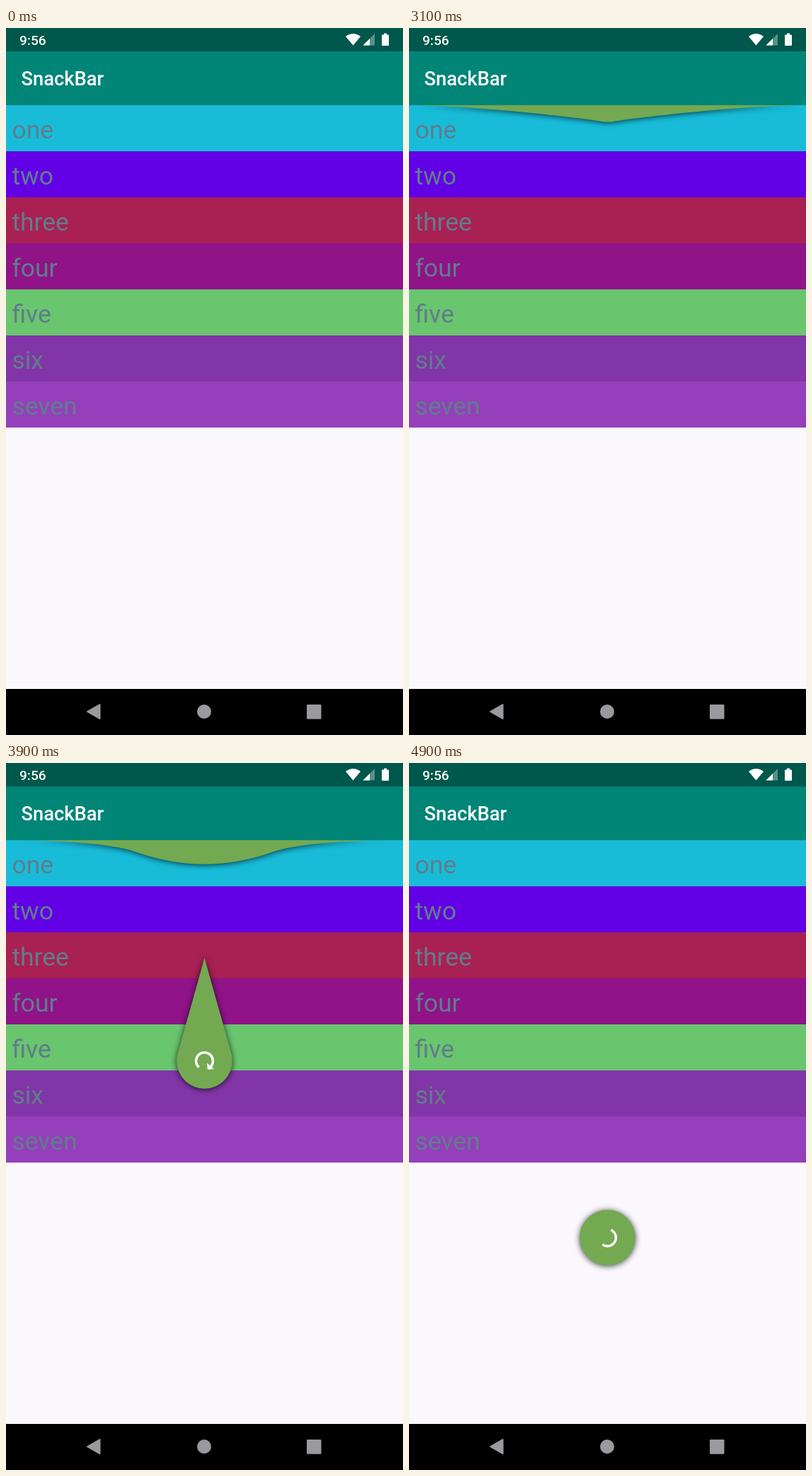
An HTML page with a canvas for the animation above (5000 ms loop, 561 by 998 pixels).

```html
<!DOCTYPE html>
<html lang="en">
<head>
<meta charset="utf-8">
<title>Pull to refresh</title>
<style>
  html, body { margin: 0; width: 100%; height: 100%; overflow: hidden; background: #faf8fc; }
  body { position: relative; font-family: Roboto, sans-serif; }
  .status, .appbar, .nav, li, canvas, svg { position: absolute; left: 0; }
  .status { top: 0; width: 561px; height: 33px; background: #00574b; }
  .appbar { top: 33px; width: 561px; height: 76px; background: #008577; }
  .nav { top: 933px; width: 561px; height: 65px; background: #000; }
  ul { margin: 0; padding: 0; list-style: none; }
  li { width: 561px; height: 65px; }
  svg, canvas { top: 0; }
  .label { font-size: 35.5px; fill: #607d8b; }
  .clock { font-size: 19.1px; font-weight: 500; fill: #fff; }
  .title { font-size: 27.3px; font-weight: 500; fill: #fff; }
</style>
</head>
<body>
<div class="status"></div>
<div class="appbar"></div>
<ul id="rows"></ul>
<div class="nav"></div>
<svg id="ui" width="561" height="998" viewBox="0 0 561 998">
  <text class="clock" x="19" y="24">9:56</text>
  <text class="title" x="21.5" y="81">SnackBar</text>
  <g fill="#fff">
    <path d="M480 12 Q490.5 4 501 12 L490.5 24.5Z"/>
    <path d="M504.500 24.500 L521 8 V24.500Z" opacity=".35"/>
    <path d="M504.500 24.500 L514 15 V24.500Z"/>
    <path d="M534 7.500h4v2h2q1 0 1 1v13.500q0 1-1 1h-8q-1 0-1-1v-13.500q0-1 1-1h2z"/>
  </g>
  <g fill="#9a999d" stroke="#9a999d" stroke-width="2" stroke-linejoin="round">
    <path d="M115 965 L132.500 955 V975Z"/>
    <circle cx="280" cy="965" r="9"/>
    <path d="M426 956h18.500v18.500h-18.500z"/>
  </g>
</svg>
<canvas id="wave" width="561" height="998"></canvas>
<script>
const LOOP = 5000, STEP = 100;
const W = 561, TOP = 109, CX = W / 2, R = 39.3;
const PULL = 3100, DROP = 3709, SPIN = 3976;
const FINISH = 666, CYCLE = 1333;
const DP = 1.365, RING = 8.75 * DP, STROKE = 2.5 * DP;
const MIN_ARC = STROKE / (2 * Math.PI * RING), MAX_ARC = 0.8;
const { min, max, sqrt, cos, PI } = Math;

const rows = [
  ["one", "#18bcd9"], ["two", "#6200e6"], ["three", "#a92053"], ["four", "#901388"],
  ["five", "#69c56e"], ["six", "#8235a8"], ["seven", "#953fbc"]
];
rows.forEach(([name, color], i) => {
  const li = document.createElement("li");
  li.style.cssText = `top:${TOP + i * 65}px;background:${color}`;
  document.getElementById("rows").append(li);
  const text = document.createElementNS("http://www.w3.org/2000/svg", "text");
  text.setAttribute("class", "label");
  text.setAttribute("x", 8.4);
  text.setAttribute("y", TOP + i * 65 + 47);
  text.textContent = name;
  document.getElementById("ui").append(text);
});

const ctx = document.getElementById("wave").getContext("2d");
const clamp = v => min(1, max(0, v));
const lerp = (a, b, k) => a + (b - a) * k;
const easeInOut = k => (1 - cos(PI * k)) / 2;

function bounce(k) {
  k *= 1.1226;
  const hop = (shift, base) => 8 * (k - shift) ** 2 + base;
  if (k < 0.3535) return hop(0, 0);
  if (k < 0.7408) return hop(0.54719, 0.7);
  if (k < 0.9644) return hop(0.8526, 0.9);
  return hop(1.0435, 0.95);
}

// Two squashes, the second half as strong
function wobble(k) {
  if (k > 0 && k < 0.25) return 0.6 - 38.4 * (k - 0.125) ** 2;
  if (k >= 0.5 && k < 0.75) return 0.3 - 19.2 * (k - 0.625) ** 2;
  return 0;
}

// cubic-bezier(.4, 0, .2, 1)
function fastOutSlowIn(x) {
  let lo = 0, hi = 1;
  for (let i = 0; i < 20; i++) {
    const u = (lo + hi) / 2, v = 1 - u;
    if (1.2 * v * v * u + 0.6 * v * u * u + u ** 3 < x) lo = u; else hi = u;
  }
  return lo * lo * (3 - 2 * lo);
}

function fillShadowed(path) {
  ctx.save();
  ctx.shadowColor = "rgba(0,0,0,.75)";
  ctx.shadowBlur = 9;
  ctx.shadowOffsetY = 1;
  ctx.fillStyle = "#73a950";
  ctx.fill(path);
  ctx.restore();
}

// Stretched sheet while pulling; returns the icon's centre
function drawPull(d) {
  const m2 = max(0, d - 0.1), m3 = max(0, (d - 0.26) / 5);
  const reach = (y, appear, expand) => min(min(y + d + m2, appear) + m3, expand);
  const mid = reach(0, 0.1302, 0.2061), tip = reach(0, 0.2173, 0.2889);
  const pts = [
    [0, 0],
    [0.1655, 0],
    [min(min(0.4188 + m2, 0.5237) + m3, 0.5909), max(min(d, 0.1) - 0.0109 - m3, 0)],
    [max(0.4606 - m2, 0.4557), reach(-0.0049, 0.0936, 0.1642)],
    [m3 > 0 ? 0.3941 : max(0.4893 - m2, 0.3908), mid],
    [max(0.4893 - m2, 0.4303), tip],
    [0.5, tip]
  ];
  const mirrored = pts.slice(0, -1).reverse().map(([x, y]) => [1 - x, y]);
  const all = [...pts, ...mirrored].map(([x, y]) => [x * W, y * W]);
  const path = new Path2D();
  path.moveTo(0, 0);
  for (let i = 1; i < all.length; i += 3) {
    path.bezierCurveTo(...all[i], ...all[i + 1], ...all[i + 2]);
  }
  fillShadowed(path);
  return mid * W + 9;
}

function drawRebound(h) {
  if (h < 0.3) return;
  const path = new Path2D();
  path.moveTo(0, 0);
  path.quadraticCurveTo(W * 0.25, 0, W * 0.333, h * 0.5);
  path.quadraticCurveTo(W * 0.5, h * 1.4, W * 0.666, h * 0.5);
  path.quadraticCurveTo(W * 0.75, 0, W, 0);
  fillShadowed(path);
}

function drawDrop(ms) {
  const k = easeInOut(clamp(ms / 500));
  const y = lerp(W * 500 / 1440, W, k), vertex = lerp(0, W - R, k);
  const wide = wobble((ms - 500) / 500), tall = wobble((ms - 625) / 500);
  const path = new Path2D();
  path.ellipse(CX, y, R * (1 + wide - tall / 2), R * (1 + tall - wide / 2), 0, 0, 2 * PI);
  const gap = y - vertex;
  if (ms < 500 && gap > R) {
    const dx = R * sqrt(1 - (R / gap) ** 2), ty = y - R * R / gap;
    path.moveTo(CX, vertex);
    path.lineTo(CX + dx, ty);
    path.lineTo(CX - dx, ty);
    path.closePath();
  }
  fillShadowed(path);
  return y;
}

// Angles in turns, clockwise from three o'clock
function drawIcon(y, start, end, arrow) {
  if (end - start < 0.01) return;
  ctx.save();
  ctx.translate(CX, y);
  ctx.strokeStyle = ctx.fillStyle = "#fff";
  ctx.lineWidth = STROKE;
  ctx.lineCap = arrow ? "butt" : "square";
  ctx.beginPath();
  ctx.arc(0, 0, RING, start * 2 * PI, end * 2 * PI);
  ctx.stroke();
  if (arrow) {
    const w = 10 * DP * arrow, x = RING - 5.625 * DP * arrow;
    ctx.rotate(end * 2 * PI - PI / 36);
    ctx.beginPath();
    ctx.moveTo(x, 0);
    ctx.lineTo(x + w, 0);
    ctx.lineTo(x + w / 2, w / 2);
    ctx.fill();
  }
  ctx.restore();
}

function pullIcon(d, y) {
  const seed = (5 - sqrt(25 - 28 * d)) / 4;
  const drag = seed * W / (128 * DP);
  const grow = min(0.95, max(min(drag, 1) - 0.4, 0) * 5 / 3);
  const over = max(0, drag - 1);
  const turn = (-0.25 + 0.4 * grow + (4 - over) * over / 4) / 2;
  drawIcon(y, turn, turn + MAX_ARC * grow, grow);
}

function dropIcon(t, y) {
  const held = 0.305 + (min(t, SPIN) - 3600) * 0.0002;
  const full = 0.76, tail = full - MIN_ARC;
  const f = clamp((t - SPIN) / FINISH);
  if (f < 1) {
    const turn = lerp(held, 1, f);
    drawIcon(y, turn + tail * f, turn + full, 0.95);
    return;
  }
  const k = (t - SPIN - FINISH) / CYCLE;
  const turn = 0.65 * k;
  const grow = (MAX_ARC - MIN_ARC) * fastOutSlowIn(min(1, 2 * k));
  drawIcon(y, turn + tail, turn + full + grow, 0);
}

function draw(now) {
  const t = Math.floor(now % LOOP / STEP) * STEP;
  ctx.clearRect(0, 0, W, 998);
  if (t >= PULL) {
    ctx.save();
    ctx.beginPath();
    ctx.rect(0, TOP, W, 824);
    ctx.clip();
    ctx.translate(0, TOP);
    if (t <= 3600) {
      const d = 0.042 + (t - PULL) * 0.001025;
      pullIcon(d, drawPull(d));
    } else {
      const ms = max(0, t - DROP);
      drawRebound(ms < 1000 ? W * 0.1 * (1 - bounce(ms / 1000)) : 0);
      dropIcon(t, drawDrop(ms));
    }
    ctx.restore();
  }
}

const begin = performance.now();
function tick() {
  draw(performance.now() - begin);
  requestAnimationFrame(tick);
}
tick();
</script>
</body>
</html>
```
